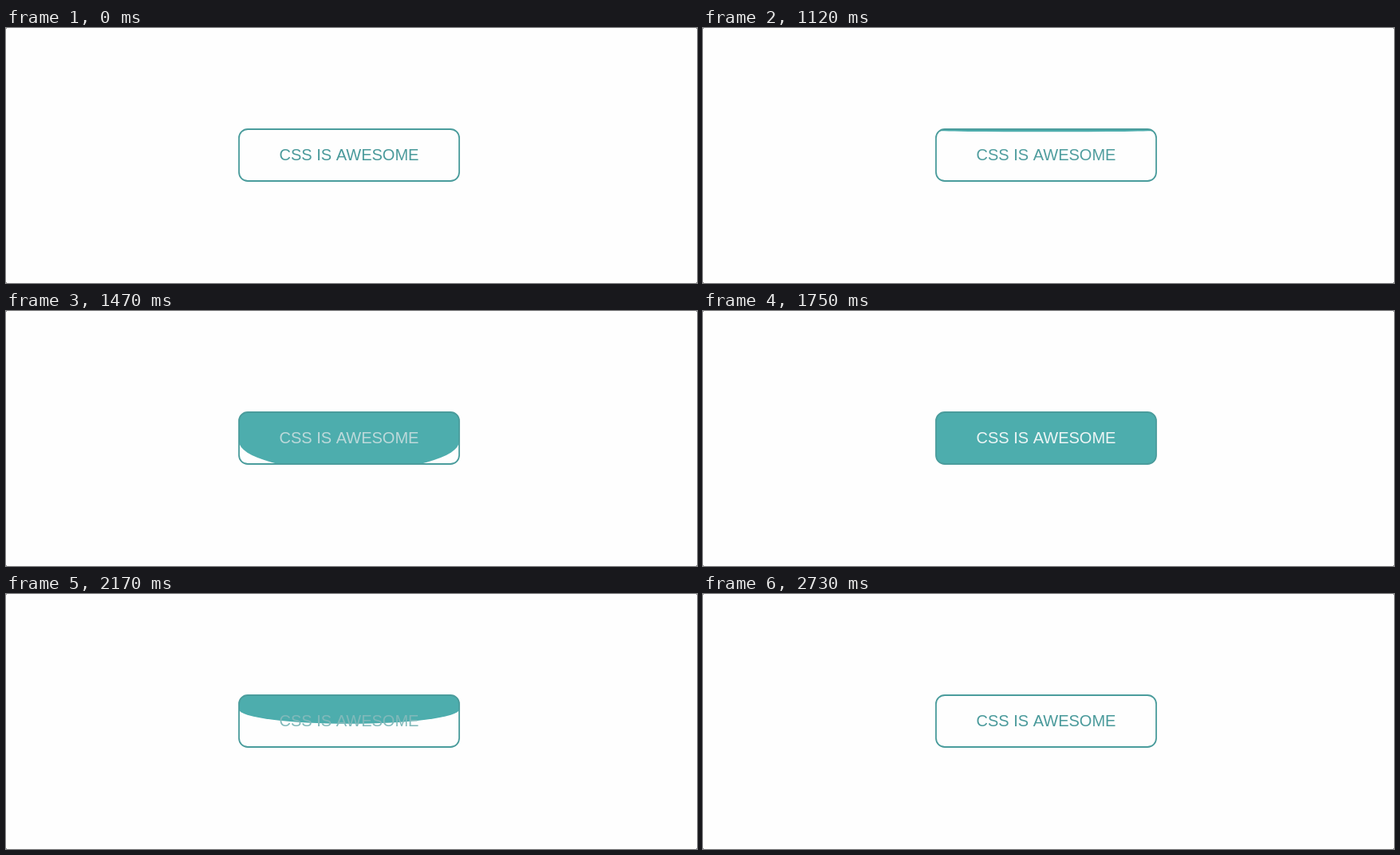
Animation of 866x320 px, one loop 2870 ms. Source, as an HTML page with a canvas:

```html
<!DOCTYPE html>
<html lang="en">
<head>
<meta charset="utf-8">
<title>Button hover</title>
<style>
  html, body { margin: 0; width: 100%; height: 100%; overflow: hidden; background: #fefefe; }
  canvas { display: block; width: 866px; height: 320px; }
</style>
</head>
<body>
<canvas id="stage" width="866" height="320"></canvas>
<script>
const ctx = document.getElementById('stage').getContext('2d');

const LOOP = 2870, STEP = 70;
const ENTER = 1070, LEAVE = 1780, DURATION = 1100;
const HELD_FROM = 1750, HELD_TO = 1890;
const BOX = { x: 292, y: 127, w: 276, h: 65, r: 11 };
const FULL = BOX.h * 1.8;
const TEAL = [74, 154, 155], WHITE = [255, 255, 255];
const BORDER = '#4a9c9c', FILL = '#4dadad';

// CSS "ease": cubic-bezier(.25, .1, .25, 1)
function ease(x) {
  if (x <= 0) return 0;
  if (x >= 1) return 1;
  const bezier = (s, a, b) => 3 * (1 - s) ** 2 * s * a + 3 * (1 - s) * s * s * b + s ** 3;
  let lo = 0, hi = 1;
  for (let i = 0; i < 30; i++) {
    const mid = (lo + hi) / 2;
    if (bezier(mid, 0.25, 0.25) < x) lo = mid; else hi = mid;
  }
  return bezier(lo, 0.1, 1);
}

const enterAt = t => ease((t - ENTER) / DURATION);
const peak = enterAt(LEAVE);

// The way back starts before the way in has ended, so it is shortened.
function hoverAt(t) {
  if (t >= HELD_FROM && t < HELD_TO) t = HELD_FROM;
  return t < LEAVE ? enterAt(t) : peak * (1 - ease((t - LEAVE) / (DURATION * peak)));
}

function boxPath() {
  ctx.beginPath();
  ctx.roundRect(BOX.x, BOX.y, BOX.w, BOX.h, BOX.r);
}

function drawFill(height) {
  if (height < 0.3) return;
  const { x, y, w } = BOX;
  ctx.save();
  boxPath();
  ctx.clip();
  ctx.beginPath();
  ctx.moveTo(x, y);
  ctx.lineTo(x + w, y);
  ctx.lineTo(x + w, y + height / 2);
  ctx.ellipse(x + w / 2, y + height / 2, w / 2, height / 2, 0, 0, Math.PI);
  ctx.closePath();
  ctx.fillStyle = FILL;
  ctx.fill();
  ctx.restore();
}

function drawStage() {
  ctx.fillStyle = '#fefefe';
  ctx.fillRect(0, 0, 866, 320);
  ctx.fillStyle = '#8c8c8c';
  for (const x of [0, 865]) for (const y of [0, 319]) ctx.fillRect(x, y, 1, 1);
}

function draw(t) {
  const hover = hoverAt(t);
  drawStage();
  drawFill(FULL * hover);

  boxPath();
  ctx.strokeStyle = BORDER;
  ctx.lineWidth = 1.8;
  ctx.stroke();

  const rgb = TEAL.map((c, i) => Math.round(c + (WHITE[i] - c) * hover));
  ctx.fillStyle = `rgb(${rgb})`;
  ctx.font = '20px "Liberation Sans", Arial, sans-serif';
  ctx.textAlign = 'center';
  ctx.fillText('CSS IS AWESOME', 430, 166);
}

const start = performance.now();
function tick() {
  const t = (performance.now() - start) % LOOP;
  draw(Math.floor(t / STEP) * STEP);
  requestAnimationFrame(tick);
}
tick();
</script>
</body>
</html>
```
